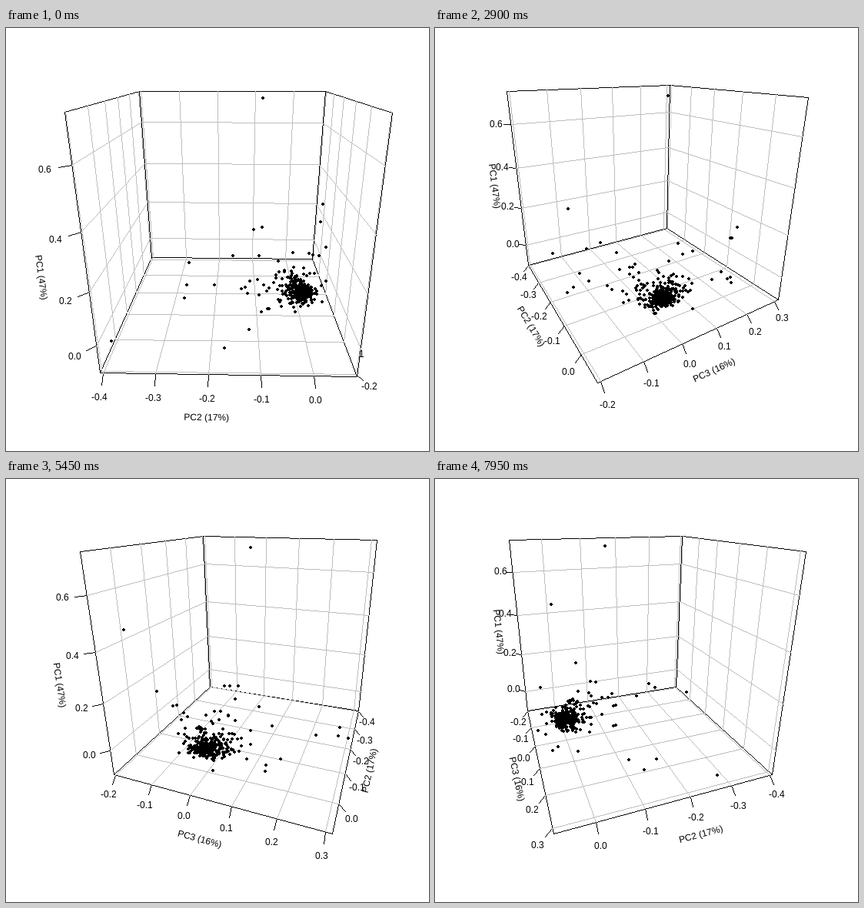
An HTML page with a canvas for the animation above (8 s loop, 550 px wide and 550 px high).

```html
<!DOCTYPE html>
<html lang="en">
<head>
<meta charset="utf-8">
<title>Rotating 3D scatter plot</title>
<style>
  html, body { margin: 0; width: 100%; height: 100%; overflow: hidden; background: #fff; }
  canvas { display: block; }
</style>
</head>
<body>
<canvas id="plot" width="550" height="550"></canvas>
<script>
const ctx = document.getElementById('plot').getContext('2d');

const FRAME_MS = 50, FRAMES = 160;
const RAD = Math.PI / 180;
const ELEVATION = 20 * RAD, SIN_E = Math.sin(ELEVATION), COS_E = Math.cos(ELEVATION);
const EYE = 2 + Math.sqrt(3);
const TICK = 0.06;
const GRID = '#bebebe', INK = '#000';
const AREA = { cx: 289.4, cy: 267.8, w: 426.6, h: 386.6 };

// Axes 0, 1 and 2 run along x, y and z of a cube reaching from -1 to 1.
function makeAxis(label, min, max, step) {
  const ticks = [];
  for (let i = Math.ceil(min / step); i * step <= max; i++) {
    const value = i * step;
    ticks.push({ at: (2 * value - min - max) / (max - min), text: (value || 0).toFixed(1) });
  }
  return { label, ticks };
}
const AXES = [
  makeAxis('PC2 (17%)', -0.405, 0.08, 0.1),
  makeAxis('PC3 (16%)', -0.2055, 0.3135, 0.1),
  makeAxis('PC1 (47%)', -0.112, 0.742, 0.2)
];

// The few points that stand apart; all others are seeded clouds.
const OUTLIERS = [
  [.28, .085, 1], [.62, -1, .285], [-1, -.69, -.937], [.94, .39, -.07],
  [.37, .92, -.55], [.27, 1, -.615], [-.515, .85, -.99], [.02, .67, -.806],
  [.99, .31, -.515], [.4, -.87, -.41], [-.385, -.49, -.64], [-.383, -.32, -.61],
  [-.03, -.85, -.87]
];

let seed = 20;
function random() {
  seed = (Math.imul(seed, 1664525) + 1013904223) >>> 0;
  return (seed + 0.5) / 4294967296;
}
const gauss = () => Math.sqrt(-2 * Math.log(random())) * Math.cos(2 * Math.PI * random());

function cloud(count, centre, spread) {
  return Array.from({ length: count }, () => {
    const [x, y, z] = centre.map((c, i) => c + spread[i] * gauss());
    return [Math.min(x, 0.9), Math.max(y, -0.85), Math.max(z, -0.84)];
  });
}
const POINTS = [
  ...OUTLIERS,
  ...cloud(210, [.69, -.205, -.74], [.042, .062, .022]),
  ...cloud(130, [.64, -.19, -.715], [.1, .15, .045]),
  ...cloud(27, [.35, -.1, -.68], [.27, .36, .06])
];

const SIDES = [-1, 1];
const CORNERS = SIDES.flatMap(x => SIDES.flatMap(y => SIDES.map(z => [x, y, z])));
const FLOOR = CORNERS.filter(p => p[2] < 0).sort((a, b) => a[1] - b[1]);

function makeCamera(theta) {
  const s = Math.sin(theta), c = Math.cos(theta);
  const view = ([x, y, z]) => {
    const front = x * s - y * c;
    const w = EYE - COS_E * front - SIN_E * z;
    return [(x * c + y * s) / w, (COS_E * z - SIN_E * front) / w];
  };
  const seen = CORNERS.map(view);
  const bounds = i => {
    const v = seen.map(p => p[i]);
    return [Math.min(...v), Math.max(...v)];
  };
  const [x0, x1] = bounds(0), [y0, y1] = bounds(1);
  const scale = Math.min(AREA.w / (x1 - x0), AREA.h / (y1 - y0));
  return p => {
    const [x, y] = view(p);
    return [AREA.cx + scale * (x - (x0 + x1) / 2), AREA.cy - scale * (y - (y0 + y1) / 2)];
  };
}

// Hard-edged line without smoothing.
function line(a, b, color) {
  const [x0, y0] = a.map(Math.floor), [x1, y1] = b.map(Math.floor);
  const n = Math.max(Math.abs(x1 - x0), Math.abs(y1 - y0), 1);
  ctx.fillStyle = color;
  for (let i = 0; i <= n; i++) {
    ctx.fillRect(Math.round(x0 + (x1 - x0) * i / n), Math.round(y0 + (y1 - y0) * i / n), 1, 1);
  }
}

function tickLabel(str, [x, y]) {
  ctx.fillStyle = INK;
  ctx.fillText(str, Math.floor(x - ctx.measureText(str).width / 2), Math.floor(y + 4.3));
}

function axisTitle(str, [x, y], angle) {
  ctx.save();
  ctx.translate(x - 0.5, y - 0.5);
  ctx.rotate(angle);
  ctx.fillStyle = INK;
  ctx.fillText(str, -ctx.measureText(str).width / 2, 4.3);
  ctx.restore();
}

// "base" fixes the two other coordinates, "out" points away from the cube.
function drawAxis(project, dim, base, out) {
  const { label, ticks } = AXES[dim];
  const place = (t, steps) => {
    const p = base.map((v, i) => v + out[i] * TICK * steps);
    p[dim] = t;
    return project(p);
  };
  for (const { at, text } of ticks) {
    line(place(at, 0), place(at, 1), INK);
    tickLabel(text, place(at, 2));
  }
  const first = ticks[0].at, last = ticks[ticks.length - 1].at;
  const a = place(first, 0), b = place(last, 0);
  const [l, r] = a[0] < b[0] ? [a, b] : [b, a];
  axisTitle(label, place((first + last) / 2, 3.5), Math.atan2(r[1] - l[1], r[0] - l[0]));
}

function drawAxes(project) {
  const pick = score => FLOOR.reduce((a, b) => score(b) < score(a) - 1e-6 ? b : a);
  const low = pick(p => -project(p)[1]);
  const left = pick(p => project(p)[0]);
  drawAxis(project, 0, low, [0, low[1], -1]);
  drawAxis(project, 1, low, [low[0], 0, -1]);
  drawAxis(project, 2, left, [left[0], left[1], 0]);
}

function visiblePanels(theta) {
  const reach = EYE * COS_E;
  const eye = [reach * Math.sin(theta), -reach * Math.cos(theta)];
  const panels = [{ dim: 2, side: -1 }];
  for (const dim of [0, 1]) for (const side of SIDES) {
    if (side * eye[dim] < 1) panels.push({ dim, side });
  }
  return panels;
}

function drawPanels(project, panels) {
  const shapes = panels.map(({ dim, side }) => {
    const [u, v] = [0, 1, 2].filter(i => i !== dim);
    const at = (a, b) => {
      const p = [];
      p[dim] = side; p[u] = a; p[v] = b;
      return project(p);
    };
    return { u, v, at, quad: [at(-1, -1), at(1, -1), at(1, 1), at(-1, 1)] };
  });
  ctx.fillStyle = '#fff';
  for (const { quad } of shapes) {
    ctx.beginPath();
    quad.forEach(p => ctx.lineTo(...p));
    ctx.fill();
  }
  for (const { quad } of shapes) quad.forEach((p, i) => line(p, quad[(i + 1) % 4], INK));
  for (const { u, v, at } of shapes) {
    for (const t of AXES[u].ticks) line(at(t.at, -1), at(t.at, 1), GRID);
    for (const t of AXES[v].ticks) line(at(-1, t.at), at(1, t.at), GRID);
  }
}

function drawPoints(project) {
  ctx.fillStyle = INK;
  for (const p of POINTS) {
    const [x, y] = project(p).map(v => Math.floor(v) - 2);
    ctx.fillRect(x + 1, y, 2, 4);
    ctx.fillRect(x, y + 1, 4, 2);
  }
}

function draw(step) {
  const theta = (step + 1) * RAD;
  const project = makeCamera(theta);
  ctx.fillStyle = '#fff';
  ctx.fillRect(0, 0, 550, 550);
  ctx.font = '12px "Liberation Sans", Arial, sans-serif';
  drawAxes(project);
  drawPanels(project, visiblePanels(theta));
  drawPoints(project);
}

const start = performance.now();
let shown = -1;
function tick() {
  const step = Math.floor((performance.now() - start) / FRAME_MS) % FRAMES;
  if (step !== shown) draw(shown = step);
  requestAnimationFrame(tick);
}
tick();
</script>
</body>
</html>
```
